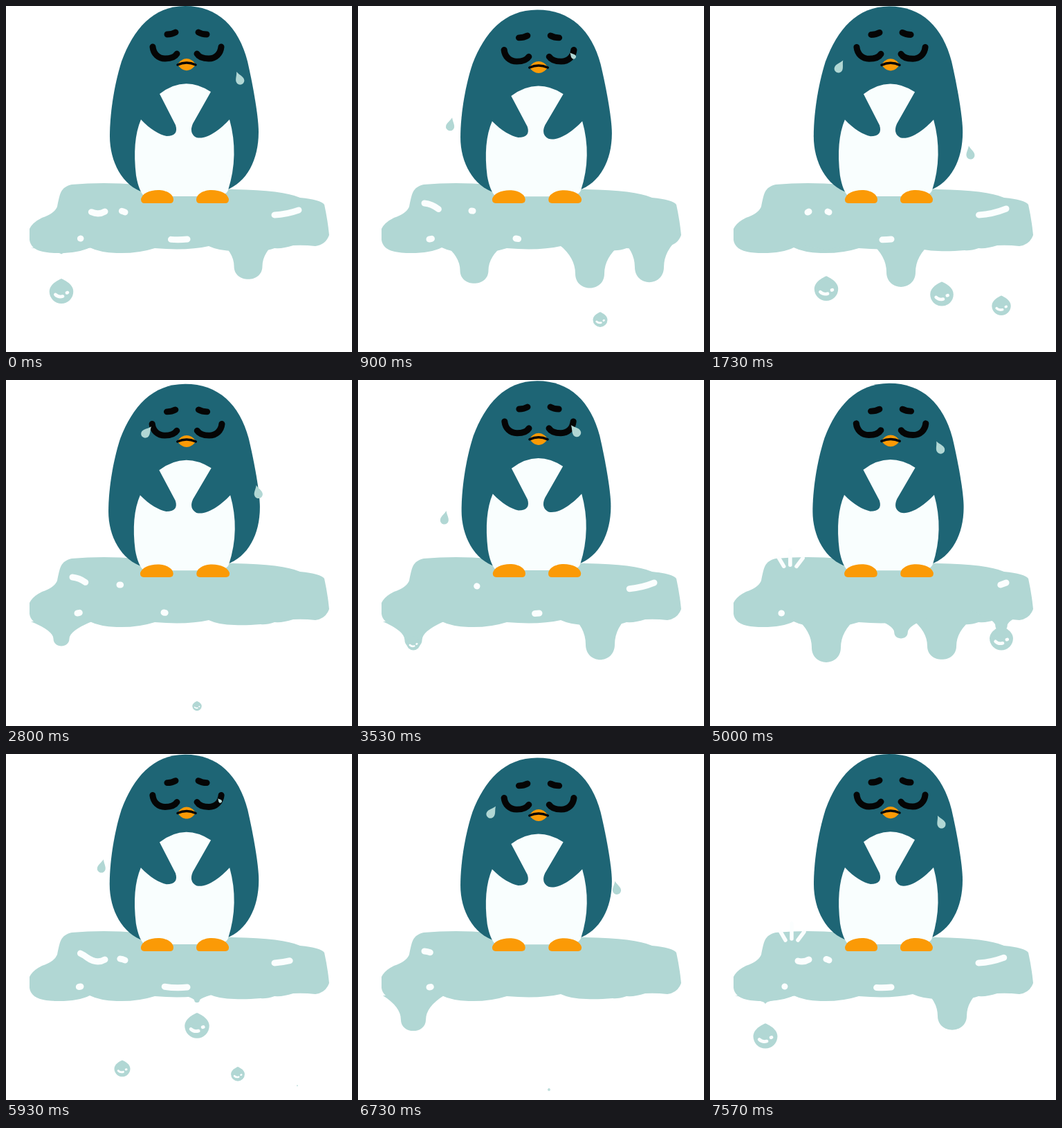
Write an HTML page that moves like this. It is 500 px wide and 500 px high and loops after 7610 ms.

```html
<!DOCTYPE html>
<html lang="en">
<head>
<meta charset="utf-8">
<title>Penguin on melting ice</title>
<style>
html, body { margin: 0; height: 100%; overflow: hidden; background: #fff; }
svg { display: block; width: 100vw; height: 100vh; }
.line { fill: none; stroke-linecap: round; stroke-linejoin: round; }
.ice { fill: #b1d7d4; }
.skin { fill: #1e6575; }
.belly { fill: #f9fefe; }
.orange { fill: #fb9a06; }
.white { stroke: #fbfefe; }
.black { stroke: #050505; }
</style>
</head>
<body>
<svg id="stage" viewBox="0 0 500 500">
  <path class="ice" d="M74 290C78 272 78 262 95 258Q140 254 190 258L330 265Q400 266 425 277Q455 280 460 287Q465 310 467 331Q462 345 447 347Q430 345 415 346Q400 351 388 350Q376 354 368 353Q345 355 330 354Q308 354 293 347Q262 354 215 350Q190 358 160 357Q135 356 121 349Q103 358 70 357C50 356 36 352 34 338V322Q38 313 52 306Q70 300 74 290Z"/>
  <g id="drips"></g>
  <g id="shines" class="line white" stroke-width="9">
    <path pathLength="1" data-start="1100" d="M388 302Q408 301 428 293"/>
    <path pathLength="1" data-start="1700" d="M96 285Q107 286 117 294Q131 304 143 297"/>
    <path pathLength="1" data-start="1600" d="M164 296Q168 296 172 298"/>
    <path pathLength="1" data-start="1530" d="M228 336Q245 339 262 337"/>
    <path pathLength="1" data-start="1850" d="M103 337L108 336"/>
  </g>
  <g id="penguin">
    <path class="skin" d="M259 0C212 0 184 34 167 80C155 118 150 160 150 188C150 225 168 260 200 270L318 266C348 255 365 222 365 182C365 160 357 115 349 80C336 30 306 0 259 0Z"/>
    <path class="belly" d="M222 127Q258 99 296 124L270 170Q264 184 275 190C290 194 310 178 323 164Q337 215 321 266Q318 275 300 275H200Q192 268 188 245Q182 195 195 164C208 178 222 186 232 188Q250 188 245 172Z"/>
    <path id="foot" class="orange" d="M195 279C197 271 207 266 220 266C232 266 242 272 242 280Q242 285 237 285H200Q195 285 195 279Z"/>
    <use href="#foot" transform="matrix(-1 0 0 1 517 0)"/>
    <path id="eye" class="line black" stroke-width="9" d="M212 59C213 69 220 76 230 76C238 76 244 74 247 69M233 41Q240 41 245 38"/>
    <use href="#eye" transform="matrix(-1 0 0 1 523 0)"/>
    <path class="orange" d="M248 84.500C255 73 267 73 274 84.500C267 96 255 96 248 84.500Z"/>
    <path class="line black" stroke-width="3.500" d="M248 85Q261 79 274 85"/>
    <path id="splash" class="line white" stroke-width="5.500" d="M102 257L109 269M118 245V267M136 257L127 269"/>
    <g id="tears"></g>
  </g>
</svg>
<script>
const $ = id => document.getElementById(id);
const BREATH = 1900, WEEP = 7600 / 6, MELT = 3800;
const SWELL = 1400, FALL = 1110, TEAR_LIFE = 1050, SHINE_HALF = 650;

function add(parent, tag, attrs = {}) {
  const el = document.createElementNS('http://www.w3.org/2000/svg', tag);
  for (const k in attrs) el.setAttribute(k, attrs[k]);
  return parent.appendChild(el);
}
const clamp = v => Math.max(0, Math.min(1, v));
const show = (el, on) => el.setAttribute('visibility', on ? 'visible' : 'hidden');
// Time since start, wrapped into one period
const since = (t, start, period) => ((t - start) % period + period) % period;

// x, ice edge, start
const drips = [
  [80, 357, 2470], [168, 352, 380], [276, 350, 900],
  [335, 353, 320], [350, 346, -900], [421, 342, 80]
].map(([x, edge, start]) => {
  const bulge = add($('drips'), 'path', { class: 'ice', transform: `translate(${x} ${edge})` });
  const drop = add($('drips'), 'g');
  add(drop, 'path', { class: 'ice', d: 'M0-1.08C.3-.95 1-.6 1 0A1 1 0 0 1-1 0C-1-.6-.3-.95 0-1.08Z' });
  add(drop, 'path', { class: 'line white', 'stroke-width': .27, d: 'M-.5 .25Q-.25 .5 .12 .4M.46 .1L.52 .08' });
  return { x, edge, start, bulge, drop };
});

const tears = [
  { side: -1, start: 100, spread: 110 },
  { side: 1, start: 790, spread: 85 }
].map(tear => ({ ...tear, el: add($('tears'), 'path', {
  class: 'ice', d: 'M0-11C2-5 6.500-1 6.500 4A6.500 6.500 0 0 1-6.500 4C-6.500-1-2-5 0-11Z' }) }));

// The ice swells into a narrowing bulge; late in the swell a drop falls out of it
function drawDrip({ x, edge, start, bulge, drop }, t) {
  const s = since(t, start, MELT);
  const l = s < SWELL ? 60 * Math.sin(s / SWELL * Math.PI) ** 2 : 0;
  const w = 21 * clamp(l / 50);
  show(bulge, l > .5);
  bulge.setAttribute('d', `M-44-8Q${-w} ${l * .2} ${-w} ${l * .62}C${-w} ${l * 1.13} ${w} ${l * 1.13} ${w} ${l * .62}Q${w} ${l * .2} 44-8Z`);
  const f = since(t, start + 950, MELT);
  const r = 18 * (1 - (f / FALL) ** 3) * clamp(f / 180);
  show(drop, r > .3);
  if (r > .3) drop.setAttribute('transform', `translate(${x} ${edge + 12 + .115 * f}) scale(${r})`);
}

// A stroke grows from its path's end to the start, then shrinks the same way
function drawShine(el, t) {
  const s = since(t, +el.dataset.start, BREATH) / SHINE_HALF;
  const head = (1 - clamp(s)) ** 1.4;
  const tail = 1 - clamp(s - 1) ** 1.4;
  show(el, s < 2);
  el.setAttribute('stroke-dasharray', `${Math.max(.001, tail - head)} 9`);
  el.setAttribute('stroke-dashoffset', -head);
}

// Constant acceleration down, drifting outwards and turning upright
function drawTear({ side, start, spread, el }, t) {
  const age = since(t, start, WEEP);
  const fall = 1.687e-4 * age * age;
  const x = 259 + side * (49 + spread * (1 - Math.exp(-fall / 92)));
  const tilt = -side * (10 + 32 * Math.exp(-fall / 40));
  show(el, age < TEAR_LIFE);
  el.setAttribute('transform', `translate(${x} ${66 + fall}) rotate(${tilt}) scale(${.92 * clamp(age / 160)})`);
}

// Poses are 40 ms apart, shown in an uneven five-beat rhythm
function poseTime(ms) {
  const beat = ms % 200;
  const step = [70, 100, 130, 170].filter(v => beat >= v).length;
  return Math.min(189, Math.floor(ms / 200) * 5 + step) * 40;
}

function draw(now) {
  const t = poseTime(now % 7610);
  const sink = (1 - Math.cos(t / BREATH * 2 * Math.PI)) / 2;
  $('penguin').setAttribute('transform',
    `translate(259 285) scale(${1 + .018 * sink} ${1 - .02 * sink}) translate(-259 -285)`);
  drips.forEach(d => drawDrip(d, t));
  for (const el of $('shines').children) drawShine(el, t);
  tears.forEach(d => drawTear(d, t));
  const landed = since(t, tears[0].start + TEAR_LIFE, WEEP);
  show($('splash'), landed < 100);
}

const begin = performance.now();
function loop() {
  draw(performance.now() - begin);
  requestAnimationFrame(loop);
}
loop();
</script>
</body>
</html>
```
